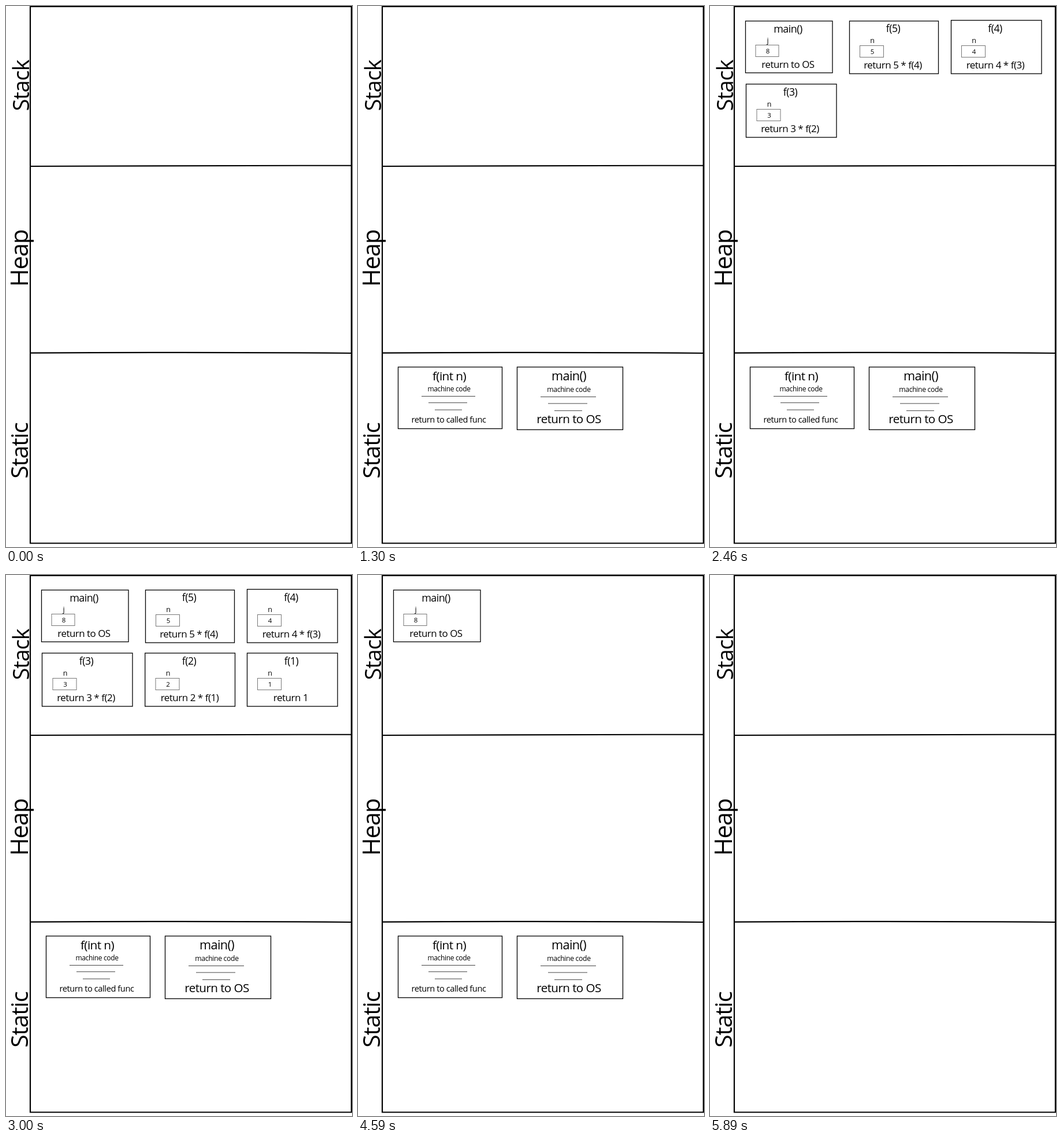
An HTML page that plays this animation: 599 by 935 pixels, repeating every 6.66 s.

```html
<!DOCTYPE html>
<html lang="en">
<head>
<meta charset="utf-8">
<title>Memory during recursion</title>
<style>
  html, body { margin: 0; width: 100%; height: 100%; overflow: hidden; background: #fff; }
  svg { display: block; }
  text { font-family: "Open Sans", "Noto Sans", sans-serif; letter-spacing: -.028em; text-anchor: middle; }
  path, rect { fill: none; stroke: #000; }
  .frame { stroke-width: 2.2; }
  .card { stroke-width: 1.3; }
  .code { stroke: #444; }
  .slot { stroke: #777; }
</style>
</head>
<body>
<svg id="stage" width="599" height="935" viewBox="0 0 599 935">
  <path class="frame" d="M42 1H598V928.5H42ZM42 277L598 275.5M42 599.7Q330 598 598 600"/>
</svg>
<script>
const LOOP = 6660;
const stage = document.getElementById('stage');
const cards = [];

const text = (x, y, size, string, extra = '') =>
  `<text x="${x}" y="${y}" font-size="${size}" ${extra}>${string}</text>`;
const box = (kind, left, top, right, bottom) =>
  `<rect class="${kind}" x="${left}" y="${top}" width="${right - left}" height="${bottom - top}"/>`;
const rule = (left, right, y) => `<path class="code" d="M${left} ${y}H${right}"/>`;

function add(markup) {
  const group = document.createElementNS('http://www.w3.org/2000/svg', 'g');
  group.innerHTML = markup;
  stage.append(group);
  return group;
}

// A card is visible from start until end.
const addCard = (start, end, markup) => cards.push({ start, end, group: add(markup) });

const region = (x, y, size, name) =>
  add(text(0, 0, size, name, `transform="translate(${x} ${y}) rotate(-90)"`));

region(39.5, 137.5, 38, 'Stack');
region(38, 436, 41.9, 'Heap');
region(38, 768.5, 40.6, 'Static');

addCard(770, 5890,
  box('card', 69.5, 624, 249.5, 730.5) +
  text(158, 646.5, 20.8, 'f(int n)') + text(157.5, 666, 12, 'machine code') +
  rule(110, 203, 674.5) + rule(122, 189, 685.7) + rule(133, 180, 698) +
  text(157, 719.5, 14.6, 'return to called func'));

addCard(1300, 5390,
  box('card', 275.5, 624, 458.5, 732.3) +
  text(365, 647, 21.6, 'main()') + text(365, 666.5, 12.2, 'machine code') +
  rule(316, 412, 675.5) + rule(329, 397, 687) + rule(340, 388, 699.4) +
  text(365, 721, 20.65, 'return to OS'));

addCard(1700, 4990,
  box('card', 61.5, 26, 212, 115.5) + text(135, 45.5, 17.9, 'main()') +
  text(100, 63.5, 12.5, 'j') + box('slot', 79, 67.5, 119, 87.5) + text(100, 82, 11.5, 8) +
  text(135, 106.5, 16.9, 'return to OS'));

function addCall(start, end, n, left, top, right, titleX, slotX, returnX) {
  const row = n > 3 ? 0 : 110;
  addCard(start, end,
    box('card', left, top, right, 117 + row) +
    text(titleX, 45 + row, 17.6, `f(${n})`) +
    text(slotX + 21.5, 63.7 + row, 12.5, 'n') +
    box('slot', slotX, 68.5 + row, slotX + 41, 88.5 + row) +
    text(slotX + 21.5, 82.7 + row, 11.5, n) +
    text(returnX, 108 + row, 17, n > 1 ? `return ${n} * f(${n - 1})` : 'return 1'));
}

addCall(2000, 4590, 5, 241.5, 26, 395.5, 317, 259.5, 316.5);
addCall(2230, 4360, 4, 417.5, 24.7, 574, 493.5, 435.5, 494);
addCall(2460, 4130, 3, 62.5, 135, 219, 139, 81, 138.5);
addCall(2730, 3900, 2, 240.7, 135, 396.5, 317, 259, 318);
addCall(3000, 3670, 1, 417.5, 135, 574, 494, 435.5, 493);

function draw() {
  const time = performance.now() % LOOP;
  for (const { start, end, group } of cards)
    group.style.display = time >= start && time < end ? '' : 'none';
  requestAnimationFrame(draw);
}
draw();
</script>
</body>
</html>
```
